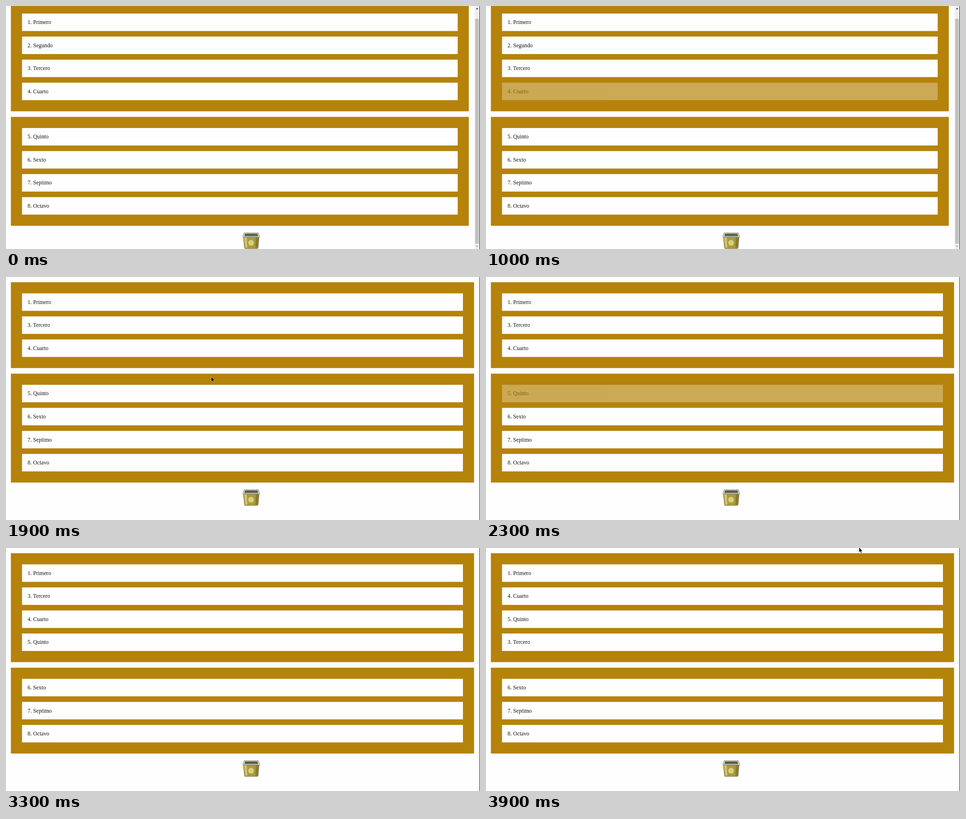
These frames come from a looping animation (1000x512 px, 4800 ms). An HTML page:

```html
<!DOCTYPE html>
<html lang="es">
<head>
<meta charset="utf-8">
<title>Listas ordenables</title>
<style>
  html, body { margin: 0; width: 100%; height: 100%; overflow: hidden; background: #fefefe; }
  svg { display: block; width: 1000px; height: 512px; }
  text { font: 11.75px "Liberation Serif", "Times New Roman", serif; fill: #111; }
</style>
</head>
<body>
<svg viewBox="0 0 1000 512">
  <rect width="1000" height="512" fill="#fefefe"/>
  <g id="panels" fill="#b5830a"></g>
  <g id="items"></g>

  <g id="bin">
    <path d="M501 8.5H534L531.8 32.2Q531.5 33.5 530 33.5H505Q503.4 33.5 503.2 32.2Z" fill="#ad9a3c" stroke="#5f5b32" stroke-width=".8"/>
    <path d="M502.5 10H508L509 32H505Z" fill="#d1c477"/>
    <path d="M527 10H533L531 32H526Z" fill="#8b7b2c"/>
    <circle cx="517" cy="21.5" r="6" fill="#d9cf83"/>
    <path d="M502.5 .5H532.5L535.3 8.7Q535.4 9.8 534 9.8H500.8Q499.4 9.8 499.6 8.7Z" fill="#e4e4da" stroke="#56564a" stroke-width=".8"/>
    <path d="M504.3 2.2H530.6L532.3 7.8H502.6Z" fill="#55564e"/>
    <path d="M504 6H531.6L532.2 7.8H502.8Z" fill="#858573"/>
  </g>

  <g id="scrollbar">
    <rect x="988.3" width="11" height="512" fill="#f1f1f1"/>
    <rect x="989.8" y="27" width="8" height="474" fill="#c1c1c1"/>
    <path d="M991 7L993.8 3.8L996.6 7Z" fill="#505050"/>
    <path d="M991 504.7L993.8 507.9L996.6 504.7Z" fill="#a3a3a3"/>
  </g>
  <rect x="999" width="1" height="512" fill="#222"/>
  <path id="cursor" d="M0 0V10.8L2.4 8.6L4.1 12.2L5.8 11.4L4.2 7.9H7.5Z" fill="#111" stroke="#fff" stroke-width=".5"/>
</svg>
<script>
const LOOP = 4800, TICK = 100;
const ITEM = 36.8, GAP = 11.75, PAD = 23.5, STEP = ITEM + GAP, LEFT = 10.3;
const NAMES = ["Primero", "Segundo", "Tercero", "Cuarto", "Quinto", "Sexto", "Septimo", "Octavo"];

// List order from each moment on; dim is the item being dragged.
const STATES = [
  { at: 0, lists: ["1234", "5678"], scrolled: true },
  { at: 800, lists: ["1234", "5678"], dim: 4, scrolled: true },
  { at: 1500, lists: ["134", "5678"], dim: 4 },
  { at: 1600, lists: ["134", "5678"] },
  { at: 2100, lists: ["134", "5678"], dim: 5 },
  { at: 2800, lists: ["1345", "678"], dim: 5 },
  { at: 3000, lists: ["1345", "678"] },
  { at: 3400, lists: ["1345", "678"], dim: 3 },
  { at: 3600, lists: ["1453", "678"], dim: 3 },
  { at: 3700, lists: ["1453", "678"] }
];

// Pointer paths, visible only between start and end.
const MOVES = [
  { start: 300, rest: 600, end: 800, from: [470, 120], to: [433, 180] },
  { start: 1700, rest: 2000, end: 2100, from: [433, 150], to: [433, 240] },
  { start: 3700, rest: 3900, end: 4800, from: [720, 190], to: [787, -1.5] }
];

const $ = id => document.getElementById(id);
function add(parent, tag, attrs) {
  const node = document.createElementNS("http://www.w3.org/2000/svg", tag);
  set(node, attrs);
  return parent.appendChild(node);
}
function set(node, attrs) {
  for (const key in attrs) node.setAttribute(key, attrs[key]);
}

const panels = [0, 1].map(() => add($("panels"), "rect", { x: LEFT }));
const items = NAMES.map((name, i) => {
  const group = add($("items"), "g", {});
  const box = add(group, "rect", { x: LEFT + PAD, height: ITEM, fill: "#fefefe" });
  add(group, "text", { x: LEFT + PAD + 11.75, y: 22.3 }).textContent = `${i + 1}. ${name}`;
  return { group, box };
});

function layout({ lists, dim, scrolled }) {
  const width = scrolled ? 966.1 : 977.2;
  let top = scrolled ? -7.6 : 11;
  items.forEach(({ group }) => set(group, { display: "none" }));
  lists.forEach((list, p) => {
    const height = list.length * STEP - GAP + 2 * PAD;
    set(panels[p], { y: top, width, height });
    [...list].forEach((id, row) => {
      const { group, box } = items[id - 1];
      set(box, { width: width - 2 * PAD });
      set(group, {
        display: "inline",
        opacity: +id === dim ? 0.3 : 1,
        transform: `translate(0 ${top + PAD + row * STEP})`
      });
    });
    top += height + GAP;
  });
  set($("bin"), { transform: `translate(0 ${top + 2.8})` });
  set($("scrollbar"), { display: scrolled ? "inline" : "none" });
}

function point(t) {
  const move = MOVES.find(m => t >= m.start && t < m.end);
  if (!move) return set($("cursor"), { display: "none" });
  const k = Math.min(1, (t - move.start) / (move.rest - move.start));
  const [x, y] = move.from.map((v, i) => v + (move.to[i] - v) * k);
  set($("cursor"), { display: "inline", transform: `translate(${x} ${y})` });
}

function render(ms) {
  const t = Math.floor((ms % LOOP) / TICK) * TICK;
  layout(STATES.filter(s => s.at <= t).pop());
  point(t);
}

const begin = performance.now();
function frame() {
  render(performance.now() - begin);
  requestAnimationFrame(frame);
}
frame();
</script>
</body>
</html>
```
